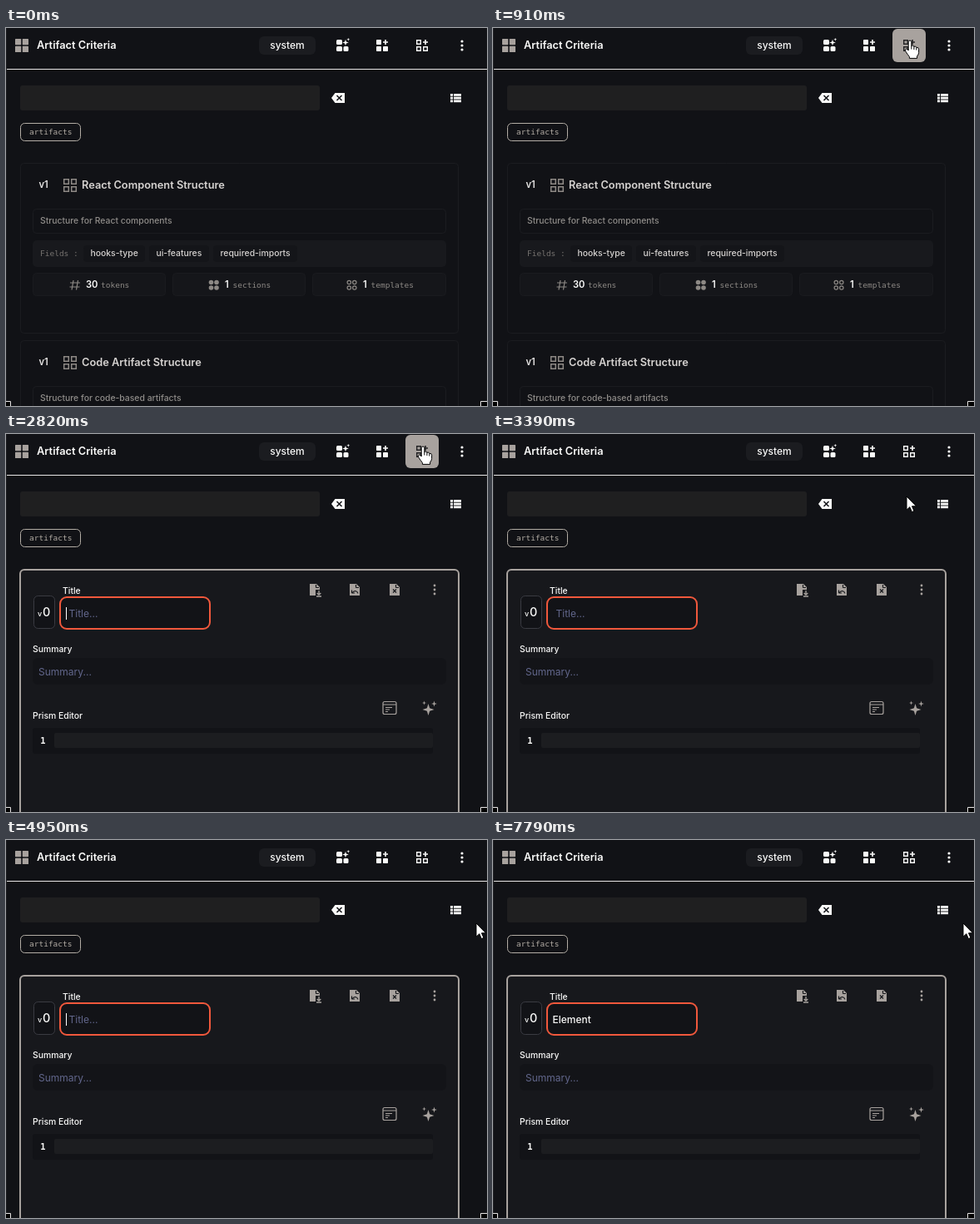
Animation, 578 px wide and 454 px high, one loop 8 s. Source, as an HTML page with a canvas:

```html
<!DOCTYPE html>
<html lang="en">
<head>
<meta charset="utf-8">
<title>Artifact Criteria</title>
<style>
html, body { margin: 0; width: 100%; height: 100%; overflow: hidden; background: #111216; }
canvas { display: block; width: 578px; height: 454px; }
</style>
</head>
<body>
<canvas id="stage" width="578" height="454"></canvas>
<script>
const ctx = document.getElementById('stage').getContext('2d');
const LOOP = 8000, STEP = 70;
const BG = '#111216', GRAY = '#a8a29e', WHITE = '#fafaf9', DIM = '#8d8985';
const UI = 'Inter, sans-serif', MONO = '"DejaVu Sans Mono", monospace', TIP = '"Open Sans", sans-serif';

function box(x, y, w, h, r, fill, stroke, lw = 1) {
  ctx.beginPath();
  ctx.roundRect(x, y, w, h, r);
  if (fill) { ctx.fillStyle = fill; ctx.fill(); }
  if (stroke) { ctx.strokeStyle = stroke; ctx.lineWidth = lw; ctx.stroke(); }
}
function text(s, x, y, size, color, weight = 400, family = UI, align = 'left') {
  ctx.font = `${weight} ${size}px ${family}`;
  ctx.textAlign = align;
  ctx.fillStyle = color;
  ctx.fillText(s, x, y);
}
const mono = (s, x, y, color = DIM) => text(s, x, y, 9.5, color, 400, MONO);
function lines(color, lw, ...segs) {
  ctx.strokeStyle = color;
  ctx.lineWidth = lw;
  ctx.beginPath();
  for (const [x1, y1, x2, y2] of segs) { ctx.moveTo(x1, y1); ctx.lineTo(x2, y2); }
  ctx.stroke();
}
function dot(x, y, r, fill, stroke, lw = 1.2) {
  ctx.beginPath();
  ctx.arc(x, y, r, 0, 7);
  if (fill) { ctx.fillStyle = fill; ctx.fill(); }
  if (stroke) { ctx.strokeStyle = stroke; ctx.lineWidth = lw; ctx.stroke(); }
}
function star(x, y, r, color) {
  ctx.beginPath();
  for (let i = 0; i < 8; i++) {
    const a = i * Math.PI / 4, d = i % 2 ? r * 0.33 : r;
    ctx.lineTo(x + d * Math.sin(a), y - d * Math.cos(a));
  }
  ctx.fillStyle = color;
  ctx.fill();
}
const mix = (a, b, k) => `rgb(${a.map((v, i) => Math.round(v + (b[i] - v) * k))})`;

// Icons
function quad(x, y, pitch, draw) {
  for (let i = 0; i < 4; i++) draw(x + i % 2 * pitch, y + (i >> 1) * pitch);
}
function kebab(x, y, color, r = 1.6) {
  for (const d of [-5, 0, 5]) dot(x, y + d, r, color);
}
function addIcon(x, color, outlined) {
  for (const [dx, dy] of [[0, 0], [0, 8], [8, 8]]) {
    if (outlined) box(x + dx + .7, 14.7 + dy, 4.6, 4.6, 0, null, color, 1.4);
    else box(x + dx, 14 + dy, 6, 6, .8, color);
  }
  lines(color, 1.6, [x + 8, 17, x + 14, 17], [x + 11, 14, x + 11, 20]);
}
function smartIcon(x) {
  box(x, 14, 7, 6, 1.5, WHITE);
  box(x, 22, 7, 6, 1.5, WHITE);
  box(x + 8.5, 22, 6, 6, 1.5, WHITE);
  star(x + 11, 17.5, 3.8, WHITE);
  star(x + 14.3, 13.8, 2, WHITE);
}
function fileIcon(x, y, kind) {
  ctx.beginPath();
  ctx.moveTo(x - 6, y - 7);
  ctx.lineTo(x + 2, y - 7);
  ctx.lineTo(x + 6, y - 3);
  ctx.lineTo(x + 6, y + 7);
  ctx.lineTo(x - 6, y + 7);
  ctx.fillStyle = GRAY;
  ctx.fill();
  const ink = '#17181c';
  lines(ink, 1.2, [x + 1.5, y - 6, x + 1.5, y - 2.5], [x + 1.5, y - 2.5, x + 5, y - 2.5]);
  if (kind === 'save') {
    box(x + 1, y, 7, 9, 0, ink);
    lines(GRAY, 1.3, [x + 5, y + 1, x + 5, y + 6], [x + 2.7, y + 4, x + 5, y + 6.3],
      [x + 7.3, y + 4, x + 5, y + 6.3], [x + 2, y + 8, x + 8, y + 8]);
  } else if (kind === 'undo') {
    ctx.beginPath();
    ctx.arc(x + .5, y + 5, 3.4, Math.PI * 1.1, Math.PI * 1.95);
    ctx.stroke();
    lines(ink, 1.2, [x - 3.5, y + .5, x - 3.5, y + 4], [x - 3.5, y + 4, x, y + 4]);
  } else {
    lines(ink, 1.2, [x - 2, y - .5, x + 2, y + 3.5], [x + 2, y - .5, x - 2, y + 3.5]);
  }
}

// Pointer
const arrow = new Path2D('M0 0V16.2L3.8 12.7L6.4 18.6L9 17.5L6.5 11.8H11.6Z');
const hand = new Path2D('M-1.8 1.5Q-1.6 0 0 0Q1.6 0 1.8 1.5V6.2Q4.4 5.4 4.9 7.2Q7.2 6.4 7.8 8.4Q10.4 7.8 10.6 10.2V14.5Q10.4 17 8.6 19V21.4H-.6V19.5Q-3 16.5-5.4 12.8Q-6.4 10.4-4.4 10Q-3 10-1.8 12Z');
function pointer(x, y) {
  const over = y < 41 && [480, 528].some(l => x >= l && x < l + 40);
  ctx.save();
  ctx.translate(x, y);
  ctx.fillStyle = '#fff';
  ctx.strokeStyle = '#000';
  ctx.lineWidth = 1;
  ctx.fill(over ? hand : arrow);
  ctx.stroke(over ? hand : arrow);
  if (over) lines('#000', 1, [1.8, 6, 1.8, 10.5], [4.9, 7, 4.9, 11], [7.8, 8.4, 7.8, 11.5]);
  ctx.restore();
}

// One entry per 70 ms step
const toButton = [[560, 94], [556, 66], [549, 40], [538, 29], [525, 29], [515, 25], [508, 20], [503, 17], [501, 15]];
const toRest = [[499, 21], [494, 38], [482, 62], [497, 75], [523, 86], [545, 93], [559, 98], [565, 100]];
const stepOf = (t, t0, path) => Math.min(path.length - 1, Math.floor((t - t0) / STEP));
function pointerAt(t) {
  if (t < 140) return null;
  if (t < 210) return [552, 447];
  if (t < 350) return null;
  if (t < 3180) return toButton[stepOf(t, 350, toButton)];
  return toRest[stepOf(t, 3180, toRest)];
}
// Hover tints rise and fall in steps
function ramp(t, on, off) {
  const up = [.35, .75, 1], down = [.68, .25, 0];
  if (t < on) return 0;
  return t < off ? up[stepOf(t, on, up)] : down[stepOf(t, off, down)];
}
function tipAlpha(t) {
  if (t < 1690 || t >= 2680) return 0;
  return t >= 2610 ? .45 : Math.min(1, (1 + Math.floor((t - 1690) / STEP)) / 4);
}

const keys = [5660, 6370, 6510, 6870, 7010, 7150, 7290];
const blinks = [[2820, 3320], [3880, 4380], [4950, 5450], [5660, 6160], [6370, 7790]];

function tile(x, k) {
  if (!k) return;
  ctx.globalAlpha = k;
  box(x, 1, 40, 40, 6, GRAY);
  ctx.globalAlpha = 1;
}
const inkFor = k => mix([250, 250, 249], [35, 35, 37], k);

function header(t) {
  quad(11, 13, 8.8, (x, y) => box(x, y, 7.2, 7.2, .6, GRAY));
  text('Artifact Criteria', 37, 25, 12.8, WHITE, 600);
  box(304, 10, 68, 22, 6, '#1b1c20');
  text('system', 338, 25, 12, WHITE, 500, UI, 'center');
  const addK = ramp(t, 770, 3250), menuK = ramp(t, 420, 630);
  tile(480, addK);
  tile(528, menuK);
  smartIcon(397);
  addIcon(445, WHITE);
  addIcon(493, inkFor(addK), true);
  kebab(548, 21, inkFor(menuK));
  box(1, 49, 577, 1, 0, '#e7e5e4');
}
function toolbar() {
  box(17, 69, 360, 30, 3, '#1f1f20');
  ctx.beginPath();
  ctx.moveTo(391, 84);
  ctx.lineTo(395.5, 78);
  ctx.lineTo(407, 78);
  ctx.lineTo(407, 90);
  ctx.lineTo(395.5, 90);
  ctx.fillStyle = WHITE;
  ctx.fill();
  lines(BG, 1.5, [397.5, 81, 403.5, 87], [403.5, 81, 397.5, 87]);
  for (const y of [79, 82.7, 86.4]) {
    box(534, y, 3, 2.8, 0, WHITE);
    box(538, y, 9, 2.8, 0, WHITE);
  }
  box(17.5, 114.5, 72, 21, 5, null, '#b3ada5');
  mono('artifacts', 28, 128, '#b3ada5');
}
function cardHead(y, title, summary) {
  text('v1', 39.5, y + 30, 11.2, '#e7e5e4', 600);
  quad(69.7, y + 19.7, 9, (x, y) => box(x, y, 5.6, 5.6, 0, null, '#8f8a86', 1.5));
  text(title, 91, y + 31, 12.8, '#d6d3d1', 600);
  box(32.5, y + 55.5, 496, 29, 4, null, '#1b1c20');
  text(summary, 41, y + 73, 10.4, '#8f8c89', 500);
}
function list() {
  box(17.5, 162.5, 526, 204, 4, null, '#1b1c20');
  cardHead(162, 'React Component Structure', 'Structure for React components');
  box(32, 255, 497, 32, 5, '#18191d');
  mono('Fields :', 41, 274, '#75726f');
  for (const [s, x, w] of [['hooks-type', 93, 74], ['ui-features', 172, 72], ['required-imports', 249, 101]]) {
    box(x, 261, w, 20, 4, '#141519');
    text(s, x + 8.5, 274, 10.4, '#d6d3d1', 500);
  }
  for (const [x, n, nx, s] of [[32, '30', 96, 'tokens'], [200, '1', 263, 'sections'], [368, '1', 429, 'templates']]) {
    box(x + .5, 294.5, x === 368 ? 160 : 159, 27, 4, '#15161a', '#1a1b1f');
    text(n, nx, 312, 11.2, WHITE, 600);
    mono(s, nx + (n === '30' ? 18 : 9.5), 312);
  }
  lines(DIM, 1.2, [77, 306, 89, 306], [76.5, 311, 88.5, 311], [81, 303, 79, 314.5], [86.5, 303, 84.5, 314.5]);
  quad(246.5, 305.5, 6.5, (x, y) => dot(x, y, 2.8, DIM));
  quad(412.3, 305.5, 6.5, (x, y) => dot(x, y, 2.2, null, DIM));
  box(17.5, 375.5, 526, 204, 4, null, '#1b1c20');
  cardHead(375, 'Code Artifact Structure', 'Structure for code-based artifacts');
}
function form(t) {
  box(17, 163, 527, 340, 5, '#17181c', GRAY, 2);
  text('Title', 68, 192, 10.4, WHITE, 500);
  box(33.5, 194.5, 25, 39, 5, '#121317', '#3a3b42');
  text('v', 38, 219, 9, WHITE, 500);
  text('0', 44, 219, 14.4, WHITE, 500);
  box(65, 196, 180, 38, 8, '#121317', '#f0583c', 2);

  const typed = 'Element'.slice(0, keys.filter(k => t >= k).length);
  if (typed) text(typed, 71.5, 220, 12, WHITE, 500);
  else text('Title...', 75.5, 220, 12, '#62678c');
  if (blinks.some(([a, b]) => t >= a && t < b)) {
    ctx.font = `500 12px ${UI}`;
    box(72 + Math.floor(ctx.measureText(typed).width), 208, 1, 15, 0, '#fff');
  }

  fileIcon(371, 187, 'save');
  fileIcon(419, 187, 'undo');
  fileIcon(467, 187, 'close');
  kebab(515, 187, GRAY, 1.4);

  text('Summary', 32, 262, 10.4, WHITE, 500);
  box(32, 269, 497, 32, 6, '#131418');
  text('Summary...', 39, 290, 12, '#62678c');

  box(453, 321.5, 16, 15, 2, null, GRAY, 1.2);
  lines(GRAY, 1.1, [453, 325, 469, 325], [456, 328.5, 464, 328.5], [456, 331, 461, 331], [456, 333.5, 459, 333.5]);
  star(507.5, 331, 7, GRAY);
  star(514.5, 324, 3.4, GRAY);
  star(502.5, 323, 2.6, GRAY);

  text('Prism Editor', 32, 342, 10.4, WHITE, 500);
  box(32, 353, 481, 31, 3, '#121317');
  box(58, 359, 455, 18, 2, '#1c1d20');
  text('1', 41.3, 372, 10.4, WHITE, 700, MONO);
}
function tooltip(k) {
  if (!k) return;
  ctx.globalAlpha = k;
  box(444.5, 45.5, 110, 49, 6, '#1b1c1f', '#e7e5e4');
  text('Add Element', 499.5, 67, 13.3, WHITE, 400, TIP, 'center');
  text('(Ctrl + Shift + E)', 499.5, 85, 12, WHITE, 400, TIP, 'center');
  ctx.globalAlpha = 1;
}

function draw(now) {
  const t = now % LOOP;
  box(0, 0, 578, 454, 0, BG);
  box(0, 0, 1, 454, 0, '#1d1e22');
  header(t);
  toolbar();
  if (t < 2820) list();
  else form(t);
  tooltip(tipAlpha(t));
  box(-2.5, 448.5, 8, 8, 0, '#000', '#e7e5e4');
  box(570.5, 448.5, 9, 8, 0, '#000', '#e7e5e4');
  const p = pointerAt(t);
  if (p) pointer(...p);
}

const start = performance.now();
function tick() {
  draw(performance.now() - start);
  requestAnimationFrame(tick);
}
tick();
</script>
</body>
</html>
```
